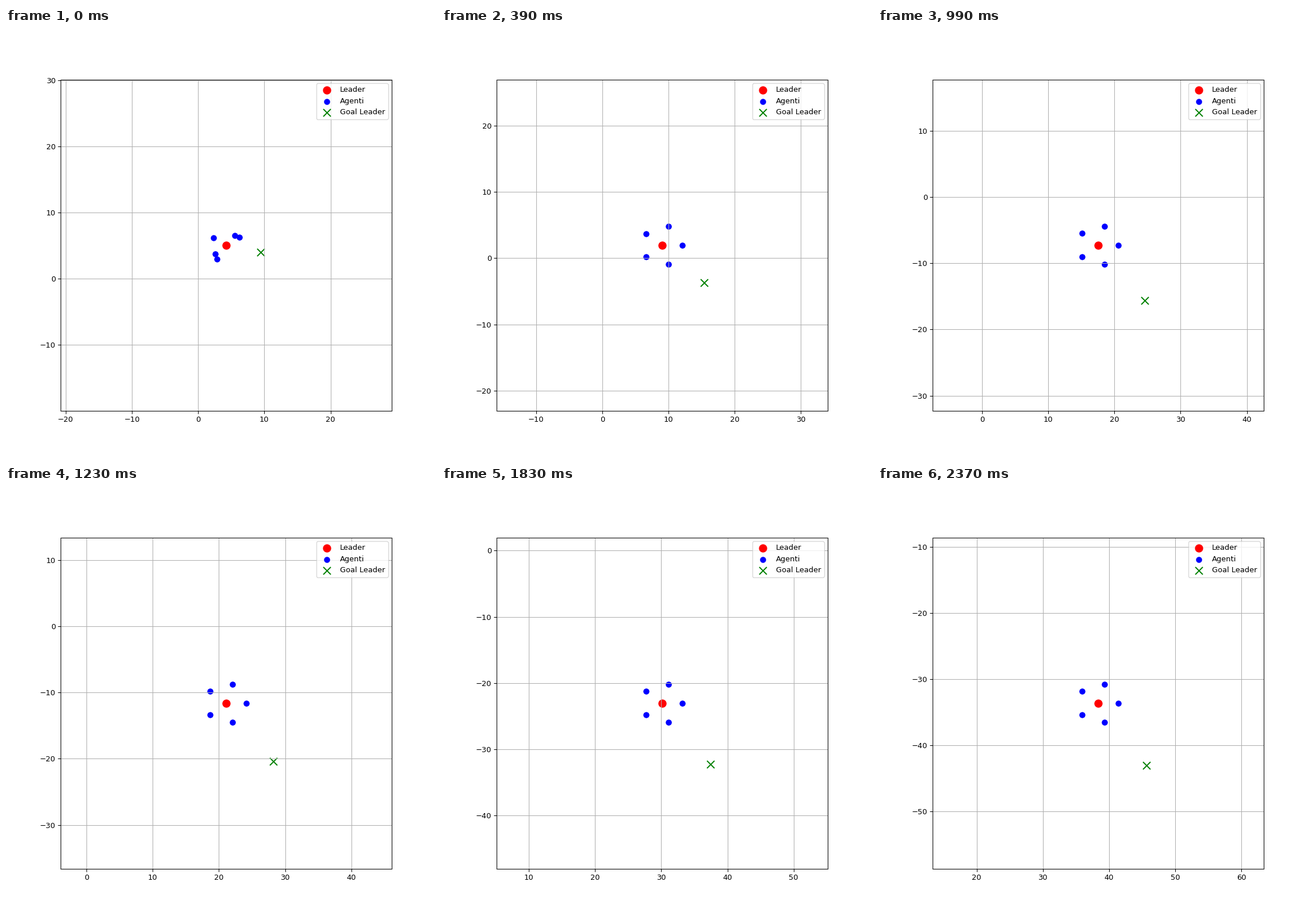
Recreate the animation shown at these times as a matplotlib script. Size 748 by 748 pixels, loop 2.4 s.

```python
import numpy as np
import matplotlib.pyplot as plt
from matplotlib.animation import FuncAnimation

INCHES, DPI = 8, 93.5
FRAMES, INTERVAL = 80, 30
HALF_VIEW = 25

# The goal drifts at constant speed; the leader closes in on a steady lag.
VELOCITY = np.array([0.458, -0.595])
GOAL_START = np.array([9.463, 4.003])
LAG = np.array([7.274, -9.45])
START_LAG = np.array([5.194, -1.07])
LEADER_DECAY = 0.94

# Agents settle from scattered places onto a ring around the leader.
ANGLES = 2 * np.pi * np.arange(5) / 5
RING = 3 * np.column_stack([np.cos(ANGLES), np.sin(ANGLES)])
SCATTERED = np.array([[1.97, 1.19], [1.23, 1.49], [-1.94, 1.10],
                      [-1.72, -1.33], [-1.38, -2.07]])
AGENT_DECAY = 0.7


def goal_at(n):
    return GOAL_START + VELOCITY * n


def leader_at(n):
    return goal_at(n) - LAG - (START_LAG - LAG) * LEADER_DECAY ** n


def agents_at(n):
    return leader_at(n) + RING + (SCATTERED - RING) * AGENT_DECAY ** n


fig, ax = plt.subplots(figsize=(INCHES, INCHES), dpi=DPI)
ax.set_aspect("equal")
ax.grid(True)

leader = ax.scatter([], [], s=100, color="red", label="Leader")
agents = ax.scatter([], [], s=50, color="blue", label="Agenti")
goal = ax.scatter([], [], s=100, color="green", marker="x", label="Goal Leader")
ax.legend(loc="upper right")


def update(n):
    x, y = leader_at(n)
    leader.set_offsets([[x, y]])
    agents.set_offsets(agents_at(n))
    goal.set_offsets([goal_at(n)])
    ax.set_xlim(x - HALF_VIEW, x + HALF_VIEW)
    ax.set_ylim(y - HALF_VIEW, y + HALF_VIEW)
    return leader, agents, goal


anim = FuncAnimation(fig, update, frames=FRAMES, interval=INTERVAL,
                     repeat=True, repeat_delay=0, blit=False)
plt.show()
```
